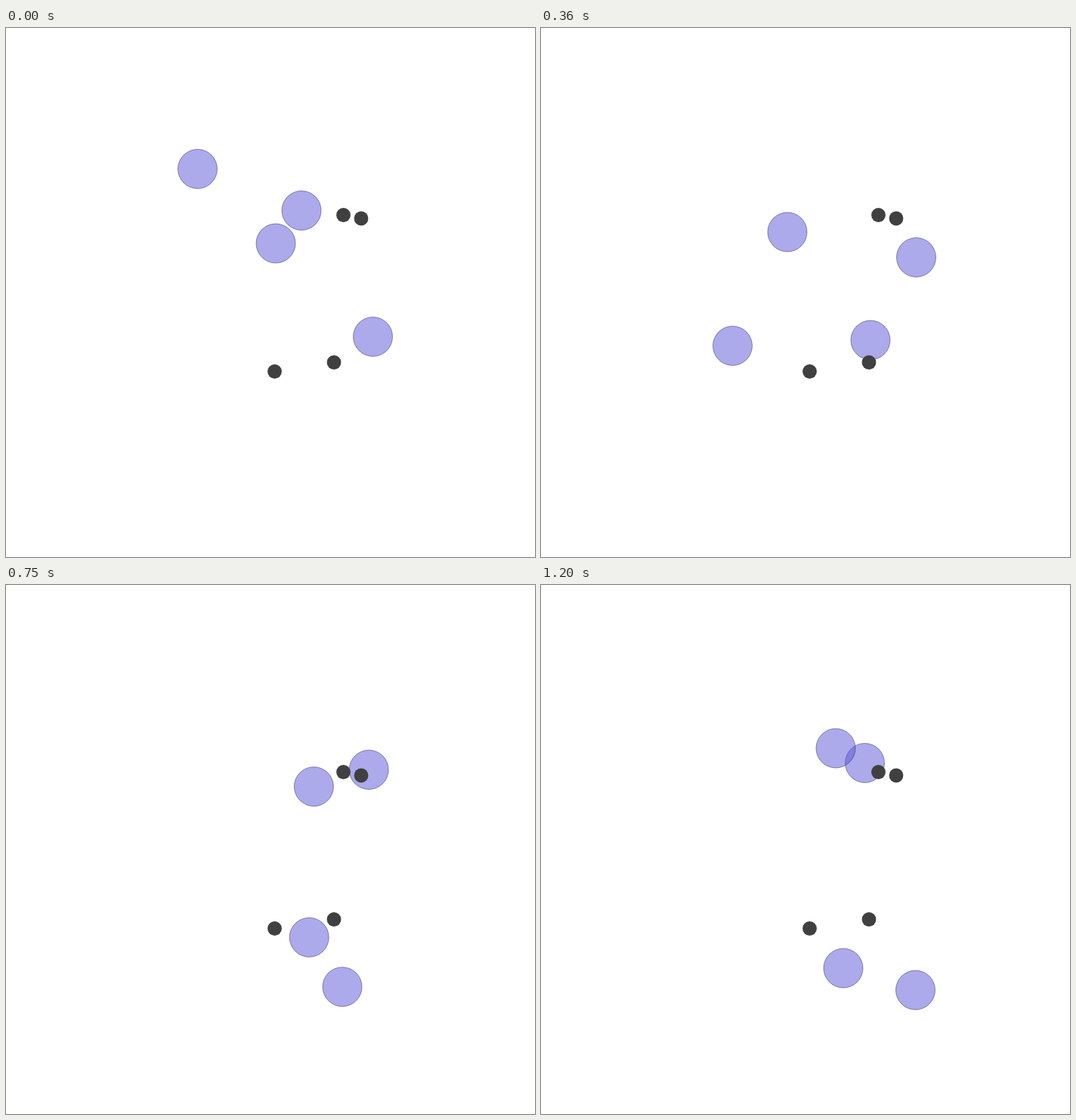
Write an HTML page with a canvas that moves like this. It is 700x700 px and loops after 1230 ms.

```html
<!DOCTYPE html>
<html>
<head>
<meta charset="utf-8">
<style>
  html, body { margin: 0; width: 100%; height: 100%; overflow: hidden; background: #fff; }
  canvas { display: block; }
</style>
</head>
<body>
<canvas id="stage" width="700" height="700"></canvas>
<script>
const LOOP = 1230, STEP = 30;
const ctx = document.getElementById('stage').getContext('2d');

// Every ball glides through one key point at each of these times (ms)
const times = [0, 150, 360, 630, 870, 1080, 1200];
const last = times.length - 1;
const balls = [
  { x: [253.5, 253.5, 253.5, 392.5, 474.5, 477.5, 495.5], y: [186.5, 281, 420.5, 524, 535, 536, 536] },
  { x: [391, 421, 326, 407, 407.5, 391.5, 428.5], y: [241.5, 292, 270, 281, 248, 237.5, 235.5] },
  { x: [357, 369, 436, 429.5, 375.5, 393.5, 400], y: [285, 349, 413, 448, 477, 476.5, 507] },
  { x: [485.5, 512, 496.5, 488.5, 472, 466.5, 390], y: [408.5, 357.5, 303.5, 247, 242, 211, 216] }
];
const dots = [[446.5, 247.5], [470, 252], [355.5, 454.5], [434, 442.5]];

const slope = (values, i) => (values[i + 1] - values[i]) / (times[i + 1] - times[i]);

// Harmonic mean of the neighbouring slopes, zero at a turning point
function tangent(values, i) {
  const a = slope(values, Math.max(i - 1, 0));
  const b = slope(values, Math.min(i, last - 1));
  return a * b > 0 ? 2 * a * b / (a + b) : 0;
}

function glide(values, t) {
  const i = Math.min(times.findLastIndex(time => time <= t), last - 1);
  const span = times[i + 1] - times[i];
  const u = (t - times[i]) / span, v = 1 - u;
  return v * v * (1 + 2 * u) * values[i] + u * u * (1 + 2 * v) * values[i + 1] +
    span * u * v * (v * tangent(values, i) - u * tangent(values, i + 1));
}

function disc(x, y, radius, fill) {
  ctx.beginPath();
  ctx.arc(x, y, radius, 0, 2 * Math.PI);
  ctx.fillStyle = fill;
  ctx.fill();
}

function draw(now) {
  const t = Math.floor(now % LOOP / STEP) * STEP;
  ctx.clearRect(0, 0, 700, 700);
  ctx.lineWidth = 0.8;
  ctx.strokeStyle = 'rgba(35,35,100,.6)';
  for (const { x, y } of balls) {
    disc(glide(x, t), glide(y, t), 26, 'rgba(91,87,215,.5)');
    ctx.stroke();
  }
  for (const [x, y] of dots) disc(x, y, 9.4, '#404040');
  requestAnimationFrame(() => draw(performance.now() - start));
}

const start = performance.now();
draw(0);
</script>
</body>
</html>
```
